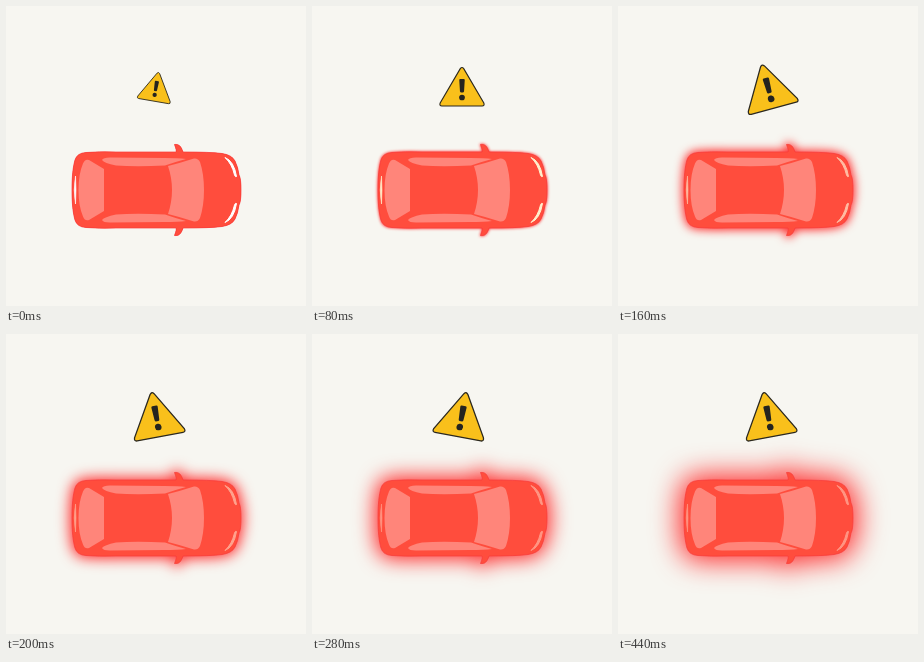
Animation of 300x300 px, one loop 480 ms. Source, as an HTML page:

```html
<!DOCTYPE html>
<html lang="en">
<head>
<meta charset="utf-8">
<title>Car alert</title>
<style>
  html, body { margin: 0; width: 100%; height: 100%; overflow: hidden; background: #f7f6f1; }
  svg { display: block; width: 100vw; height: 100vh; }
</style>
</head>
<body>
<svg viewBox="0 0 300 300">
  <defs>
    <path id="body" d="M66 184C66 170 67 161 69 154Q71 147 80 146.500Q92 145.500 110 146L170 146Q171 145 168.500 138.500C173 138 175 140 177 146Q205 146 216 147.500Q226 149 229 155Q232 161 233 169Q235 172 235 184Q235 196 233 199Q232 207 229 213Q226 219 216 220.500Q205 222 177 222C175 228 173 230 168.500 229.500Q171 223 170 222L110 222Q92 222.500 80 221.500Q71 221 69 214C67 207 66 198 66 184Z"/>
    <g id="side">
      <path d="M96 154Q97 151.500 104 151.500L158 152Q172 152 180 153Q169 156 159 159.500Q130 161 110 159.500Q98 157 96 154Z"/>
    </g>
    <path id="lamp" d="M219 151.500Q228 155 230.500 170.500Q229.500 171.500 228.500 169Q226 158 219 151.500Z"/>
  </defs>
  <use id="glow" href="#body" fill="#ff2929" stroke="#ff2929"/>
  <use href="#body" fill="#ff4d3d" stroke="#f83a38" stroke-width=".7"/>
  <g fill="#ff857a">
    <path d="M72.500 184Q72.500 168 77 157.500Q79 152.500 83 154L98 163V205L83 214Q79 215.500 77 210.500Q72.500 200 72.500 184Z"/>
    <path d="M162 160Q174 157 188 152.500Q192 152 194 156Q198 168 198 184Q198 200 194 212Q192 216 188 215.500Q174 211 162 208Q166 196 166 184Q166 172 162 160Z"/>
    <use href="#side"/>
    <use href="#side" transform="matrix(1 0 0 -1 0 368)"/>
  </g>
  <g id="lamps">
    <use href="#lamp"/>
    <use href="#lamp" transform="matrix(1 0 0 -1 0 368)"/>
    <path d="M69.500 170Q67 184 69.500 198Q70.500 184 69.500 170Z" stroke-width=".6"/>
  </g>
  <g id="sign">
    <path d="M-2.200-21Q0-24 2.200-21L25-18.500 25 18.500" fill="none"/>
    <path d="M-2-21.300Q0-24 2-21.300L25.300 18.500Q26.500 22 23.300 22H-23.300Q-26.500 22-25.300 18.500Z" fill="#f9c01b" stroke="#2b281f" stroke-width="1.300"/>
    <path d="M-3.200-8Q-3.200-9.300-2-9.300H2Q3.200-9.300 3.200-8L2.400 5Q2.300 6.300 1.200 6.300H-1.200Q-2.300 6.300-2.400 5Z" fill="#25241f"/>
    <circle cy="12.200" r="3.300" fill="#25241f"/>
  </g>
</svg>
<script>
const LOOP = 480, STEP = 40;
const get = id => document.getElementById(id);
const mix = (a, b, p) => a.map((v, i) => v + (b[i] - v) * p);

function draw(now) {
  const t = Math.floor(now % LOOP / STEP) * STEP;

  // The sign pops up while it swings, then keeps rocking.
  const grow = Math.min(1, t / 160);
  const scale = 1 - .35 * (1 - grow) ** 1.35;
  const angle = 15 * scale * Math.cos(t / 160 * Math.PI);
  get('sign').setAttribute('transform', `translate(150 81) rotate(${angle}) scale(${scale})`);

  // The glow spreads and the lamps fade into the paint.
  const blur = Math.min(14, Math.max(0, t - 40) / 24);
  get('glow').style.filter = `blur(${blur}px)`;
  get('glow').setAttribute('stroke-width', blur * .7);
  const color = t <= 80
    ? mix([255, 255, 255], [255, 240, 205], t / 80)
    : mix([255, 240, 205], [255, 150, 132], Math.min(1, (t - 80) / 140));
  get('lamps').setAttribute('fill', `rgb(${color})`);
  get('lamps').setAttribute('stroke', `rgb(${color})`);
  requestAnimationFrame(draw);
}
requestAnimationFrame(draw);
</script>
</body>
</html>
```
